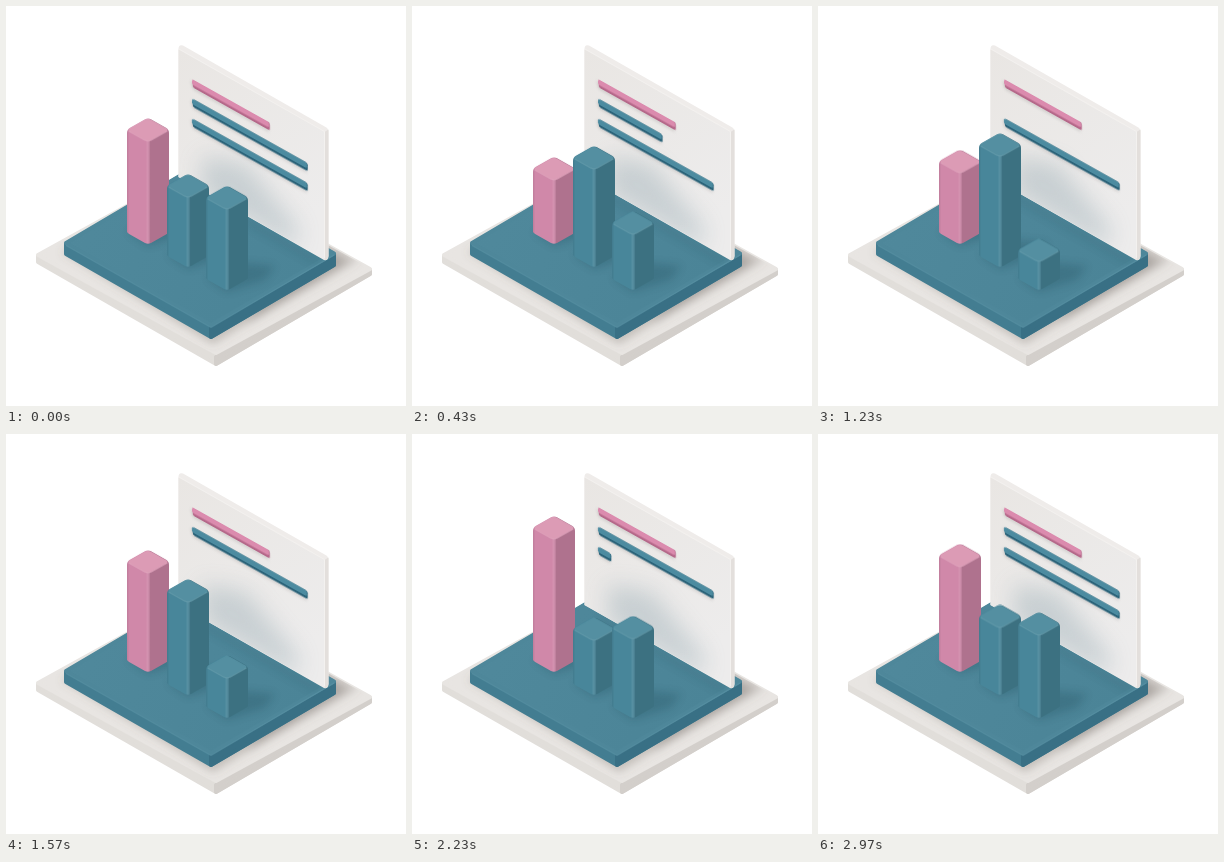
Animation of 400x400 px, one loop 3.01 s. Source, as an HTML page:

```html
<!DOCTYPE html>
<html lang="en">
<head>
<meta charset="utf-8">
<title>Isometric chart</title>
<style>
  html, body { margin: 0; width: 100%; height: 100%; overflow: hidden; background: #fff; }
  svg { display: block; width: 100vw; height: 100vh; }

  .round { stroke-width: 4; stroke-linejoin: round; }
  .pink { --side: #d088a9; --top: #dc9bb5; --edge: #e3a9c0; --line: #db8bae; --deep: #b5688a; }
  .teal { --side: #48869a; --top: #548fa1; --edge: #6ba0b0; --line: #4c8ba0; --deep: #2c647a; }
  .side { fill: var(--side); }
  .top { fill: var(--top); }
  .edge { fill: none; stroke: var(--edge); stroke-width: 1.3; stroke-linecap: round; stroke-linejoin: round; opacity: .6; }
  .line rect { height: 5.5px; rx: 1.8px; width: 115px; fill: var(--line); }
  .line rect:first-child { height: 8px; fill: var(--deep); }
  .line { filter: drop-shadow(-1px 2px 1.5px rgba(70, 60, 60, .15)); }
  .short rect { width: 77px; }

  /* Teal bars follow a sine; the pink one swings unevenly */
  .rise1 { animation: rise1 3010ms infinite; }
  .rise2 { animation: rise2 1505ms cubic-bezier(.364, 0, .636, 1) -545ms infinite alternate; }
  .rise3 { animation: rise3 1505ms cubic-bezier(.364, 0, .636, 1) -370ms infinite alternate; }
  @keyframes rise1 {
    0%     { transform: translateY(-126px); animation-timing-function: cubic-bezier(.333, .505, .667, 1); }
    25.5%  { transform: translateY(-74.5px); animation-timing-function: cubic-bezier(.333, 0, .667, .529); }
    52.16% { transform: translateY(-122px); animation-timing-function: cubic-bezier(.333, .363, .667, 1); }
    68.44% { transform: translateY(-160.2px); animation-timing-function: cubic-bezier(.333, 0, .667, .514); }
    74.09% { transform: translateY(-156px); animation-timing-function: cubic-bezier(.333, .312, .667, .48); }
    100%   { transform: translateY(-126px); }
  }
  @keyframes rise2 { from { transform: translateY(-74px); } to { transform: translateY(-139px); } }
  @keyframes rise3 { from { transform: translateY(-113px); } to { transform: translateY(-51px); } }

  /* One line is erased, the next moves up, a new one is written */
  .erase rect, .write rect, .shift { animation: 3010ms cubic-bezier(.333, 0, .667, 1) infinite; }
  .erase rect { animation-name: erase; }
  .write rect { animation-name: write; }
  .shift { animation-name: shift; }
  @keyframes erase { 0% { width: 115px; } 30.9%, 100% { width: 0; } }
  @keyframes shift { 0%, 39.87% { transform: translateY(0); } 51.83%, 100% { transform: translateY(-20px); } }
  @keyframes write { 0%, 68.11% { width: 0; } 97.34%, 100% { width: 115px; } }
</style>
</head>
<body>
<svg viewBox="0 0 400 400">
  <defs>
    <linearGradient id="shade">
      <stop offset="0" stop-color="#000" stop-opacity=".08"/>
      <stop offset=".06" stop-color="#000" stop-opacity="0"/>
      <stop offset=".44" stop-color="#fff" stop-opacity="0"/>
      <stop offset=".49" stop-color="#fff" stop-opacity=".08"/>
      <stop offset=".56" stop-color="#000" stop-opacity=".16"/>
      <stop offset="1" stop-color="#000" stop-opacity=".16"/>
    </linearGradient>
    <linearGradient id="face" x1="0" y1="0" x2=".5" y2="1">
      <stop offset="0" stop-color="#e9e6e3"/>
      <stop offset="1" stop-color="#edecec"/>
    </linearGradient>
    <linearGradient id="floor" x1="0" y1="0" x2="1" y2=".3">
      <stop offset="0" stop-color="#50899c"/>
      <stop offset="1" stop-color="#4b8497"/>
    </linearGradient>
    <filter id="soft" x="-50%" y="-50%" width="200%" height="200%"><feGaussianBlur stdDeviation="4"/></filter>
    <filter id="haze" x="-50%" y="-50%" width="200%" height="200%"><feGaussianBlur stdDeviation="11"/></filter>
    <clipPath id="foot">
      <path d="M-22-260H22V-14Q21-11 18-9.5L3-1Q0 .6-3-1L-18-9.5Q-21-11-22-14Z"/>
    </clipPath>
    <clipPath id="deck"><path d="M58 237 183 162 330 247 205 321Z"/></clipPath>
    <clipPath id="tray"><path d="M31 249 186 163 365 263 210 349Z"/></clipPath>
    <clipPath id="wall"><path d="M172.500 43.500 318.500 126V253.500L172.500 171Z"/></clipPath>
    <path id="body" d="M-21 15Q-21 11.5-18 9.8L-3 1.2Q0-.2 3 1.2L18 9.8Q21 11.5 21 15V240H-21Z"/>
    <g id="bar">
      <use href="#body" class="side"/>
      <use href="#body" fill="url(#shade)"/>
      <path class="top" d="M-18.5 10.6-3 1.7Q0 .3 3 1.7L18.5 10.6Q20.5 12 18.5 13.2L3 22Q0 23.6-3 22L-18.5 13.2Q-20.5 12-18.5 10.6Z"/>
      <path class="edge" d="M-19 13.2-3 22.2Q0 23.7 3 22.2L19 13.2"/>
    </g>
    <path id="cast" d="M-20-12 10-28 48-24 38-10 0 2Z"/>
  </defs>

  <!-- White tray -->
  <g class="round">
    <path fill="#e1deda" stroke="#e1deda" d="M32 250 186 165 364 264V268L210 358 32 256Z"/>
    <path fill="#d3cfcb" stroke="#d3cfcb" d="M210 351 364 265V268L210 358Z"/>
    <path fill="#e8e5e2" stroke="#e8e5e2" d="M32 249 186 164 364 263 210 347Z"/>
  </g>
  <g clip-path="url(#tray)" fill="#6d655f" filter="url(#soft)">
    <path d="M56 246 190 170 340 256 207 338Z" opacity=".3"/>
    <path d="M300 225 352 254 322 272 240 318Z" opacity=".28"/>
  </g>

  <!-- Teal deck -->
  <g class="round">
    <path fill="#437d91" stroke="#437d91" d="M60 238 183 165 328 248V259L205 331 60 248Z"/>
    <path fill="#397085" stroke="#397085" d="M205 322 328 249V259L205 331Z"/>
    <path fill="url(#floor)" stroke="#4e879a" d="M60 237 183 164.500 328 247.500 205 319Z"/>
  </g>
  <path d="M60 239.500 205 321.500 328 249" fill="none" stroke="#5b93a5" stroke-width="1.2" stroke-linejoin="round" opacity=".6"/>
  <g clip-path="url(#deck)" fill="#123c4c" opacity=".22" filter="url(#soft)">
    <path d="M190 182 318 256 308 258 184 188Z" opacity=".5"/>
    <use href="#cast" x="142" y="238"/>
    <use href="#cast" x="182" y="261"/>
    <use href="#cast" x="221" y="284"/>
  </g>

  <!-- Wall -->
  <path fill="#efecea" d="M172.500 43Q172.500 38 177 39.500L319.500 121Q322.500 122.500 322.500 125.500V250Q322 255 318 254L172.500 171Z"/>
  <path fill="#e3dfdc" d="M318.500 126 322.500 123.500V250Q322 255 318.500 253.800Z"/>
  <path fill="url(#face)" d="M172.500 43.500 318.500 126V253.500L172.500 171Z"/>
  <g clip-path="url(#wall)">
    <path d="M196 150 240 158 292 222 290 242 196 188Z" fill="#8fa5af" opacity=".38" filter="url(#haze)"/>
  </g>
  <path fill="none" stroke="#f3f1ef" d="M173 43 318.500 125.500V252"/>
  <g transform="matrix(1 .56 0 1 186 0)">
    <g class="line short pink"><rect x=".8" y="73"/><rect y="73"/></g>
    <g class="line teal erase"><rect x=".8" y="92.500"/><rect y="92.500"/></g>
    <g class="line teal shift"><rect x=".8" y="112.500"/><rect y="112.500"/></g>
    <g class="line teal write"><rect x=".8" y="112.500"/><rect y="112.500"/></g>
  </g>

  <!-- Bars -->
  <g class="pink" transform="translate(142 238)" clip-path="url(#foot)"><g class="rise1"><use href="#bar"/></g></g>
  <g class="teal" transform="translate(182 261)" clip-path="url(#foot)"><g class="rise2"><use href="#bar"/></g></g>
  <g class="teal" transform="translate(221 284)" clip-path="url(#foot)"><g class="rise3"><use href="#bar"/></g></g>
</svg>
</body>
</html>
```
